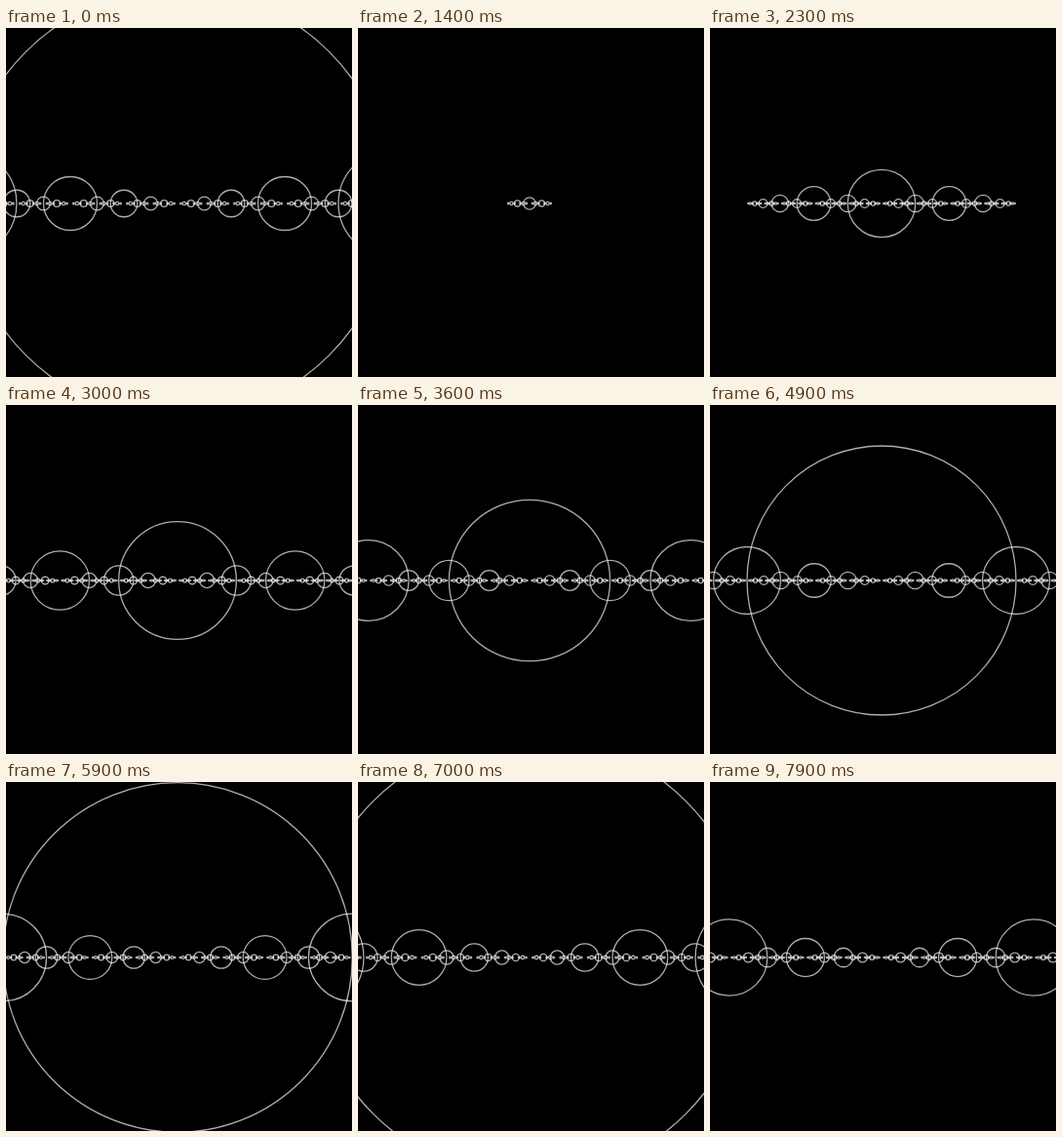
An HTML page with a canvas for the animation above (8 s loop, 355 by 358 pixels).

```html
<!DOCTYPE html>
<html lang="en">
<head>
<meta charset="utf-8">
<title>Recursive circles</title>
<style>
  html, body { margin: 0; width: 100%; height: 100%; overflow: hidden; background: #000; }
  canvas { display: block; width: 355px; height: 358px; }
</style>
</head>
<body>
<canvas id="stage"></canvas>
<script>
const WIDTH = 355, HEIGHT = 358, LOOP = 8000, STEP = 100;
const CENTER_X = 176, CENTER_Y = 180;
const UNIT = WIDTH / 400; // sketch unit in stage pixels

// The root radius follows a pointer that moves steadily between these stops.
const STOPS = [
  { time: 0, radius: 248 },
  { time: 500, radius: 5 },
  { time: 1300, radius: 5 },
  { time: 1400, radius: 7 },
  { time: 2200, radius: 35 },
  { time: 3000, radius: 68 },
  { time: 4100, radius: 114 },
  { time: 4900, radius: 155.5 },
  { time: 5900, radius: 202 },
  { time: 6500, radius: 202 },
  { time: 7900, radius: 352 }
];

const canvas = document.getElementById('stage');
const ctx = canvas.getContext('2d');
const ratio = window.devicePixelRatio || 1;
canvas.width = WIDTH * ratio;
canvas.height = HEIGHT * ratio;
ctx.scale(ratio, ratio);
ctx.strokeStyle = 'rgba(255, 255, 255, 0.68)';
ctx.lineWidth = 1.3;

function radiusAt(time) {
  const next = Math.max(1, STOPS.findIndex(stop => stop.time >= time));
  const from = STOPS[next - 1], to = STOPS[next];
  const progress = (time - from.time) / (to.time - from.time);
  return UNIT * (from.radius + (to.radius - from.radius) * progress);
}

// Each circle spawns two half-size ones, one diameter to either side.
function drawCircles(x, r) {
  if (x + 4 * r < 0 || x - 4 * r > WIDTH) return;
  ctx.beginPath();
  ctx.arc(x, CENTER_Y, r, 0, Math.PI * 2);
  ctx.stroke();
  if (r > UNIT) {
    drawCircles(x - 2 * r, r / 2);
    drawCircles(x + 2 * r, r / 2);
  }
}

const start = performance.now();
let shown = -1;

function tick() {
  const elapsed = (performance.now() - start) % LOOP;
  const time = Math.floor(elapsed / STEP) * STEP;
  if (time !== shown) {
    shown = time;
    ctx.fillStyle = '#000';
    ctx.fillRect(0, 0, WIDTH, HEIGHT);
    drawCircles(CENTER_X, radiusAt(time));
  }
  requestAnimationFrame(tick);
}
tick();
</script>
</body>
</html>
```
